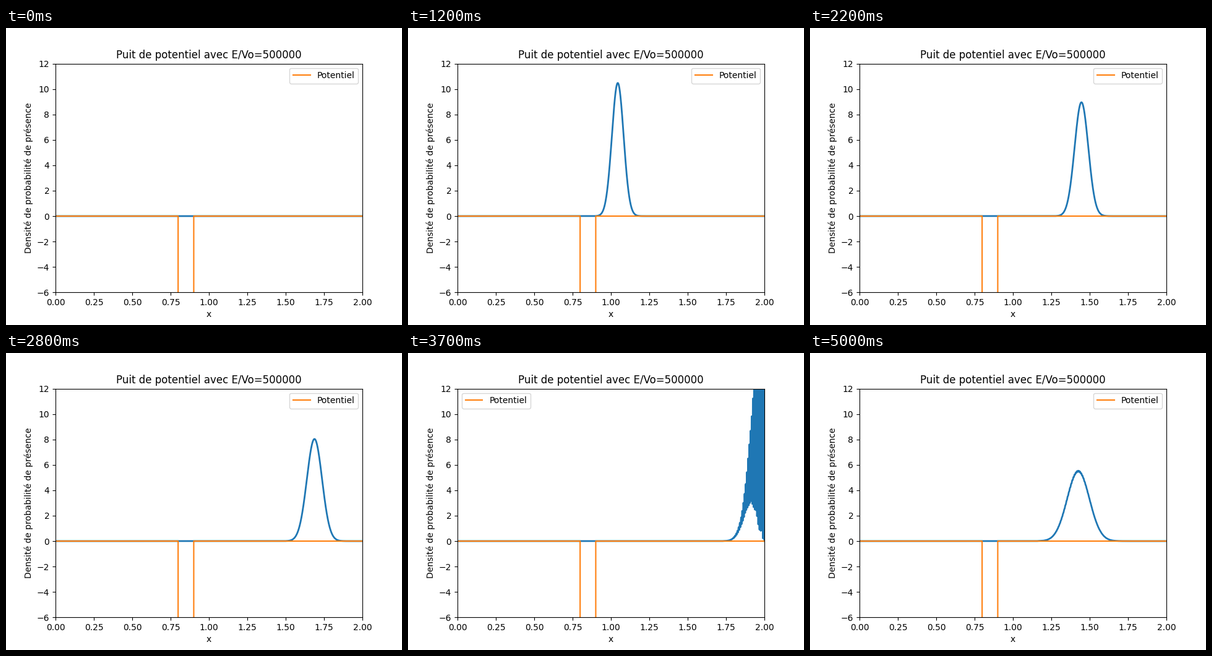
A matplotlib script that plays this animation: 640x480 px, repeating every 5.1 s.

```python
import numpy as np
import matplotlib.pyplot as plt
from matplotlib.animation import FuncAnimation

FRAMES = 51
INTERVAL = 100        # ms
PAIRS = 500           # leapfrog pairs between two frames
DT, DX, NX = 1e-7, 0.001, 2000
S = DT / DX**2
DEPTH = -4000
RATIO = 500000        # E / V0
START, SIGMA = 0.6, 0.05

x = np.linspace(0, (NX - 1) * DX, NX)
well = np.where((x >= 0.8) & (x <= 0.9), DEPTH, 0.0)


def simulate():
    """Density of a Gaussian wave packet crossing the well, one row per frame."""
    k = np.sqrt(2 * abs(RATIO * DEPTH))
    norm = 1 / np.sqrt(SIGMA * np.sqrt(np.pi))
    psi = norm * np.exp(1j * k * x - (x - START)**2 / (2 * SIGMA**2))
    re, im = psi.real.copy(), psi.imag.copy()
    diag = 2 * (S + well[1:-1] * DT)

    def kick(f):
        return S * (f[2:] + f[:-2]) - diag * f[1:-1]

    # The first row stays empty: the packet appears on the second frame.
    rows = np.zeros((FRAMES, NX))
    for row in rows[1:]:
        for step in range(PAIRS):
            old = im[1:-1].copy() if step == 0 else None
            im[1:-1] += kick(re)
            if step == 0:
                row[1:-1] = re[1:-1]**2 + im[1:-1] * old
            re[1:-1] -= kick(im)
    return rows


density = simulate()

fig, ax = plt.subplots(figsize=(6.4, 4.8), dpi=100)
line, = ax.plot([], [], lw=2)
ax.plot(x, well, label="Potentiel")
ax.set_xlim(0, 2)
ax.set_ylim(-6, 12)
ax.set_title(f"Puit de potentiel avec E/Vo={RATIO}")
ax.set_xlabel("x")
ax.set_ylabel("Densité de probabilité de présence")
ax.legend(loc="best")  # moves aside when the packet reaches the corner


def update(frame):
    line.set_data(x, density[frame])
    return line,


ani = FuncAnimation(fig, update, frames=FRAMES, interval=INTERVAL,
                    repeat=True, repeat_delay=0, blit=False)
plt.show()
```
